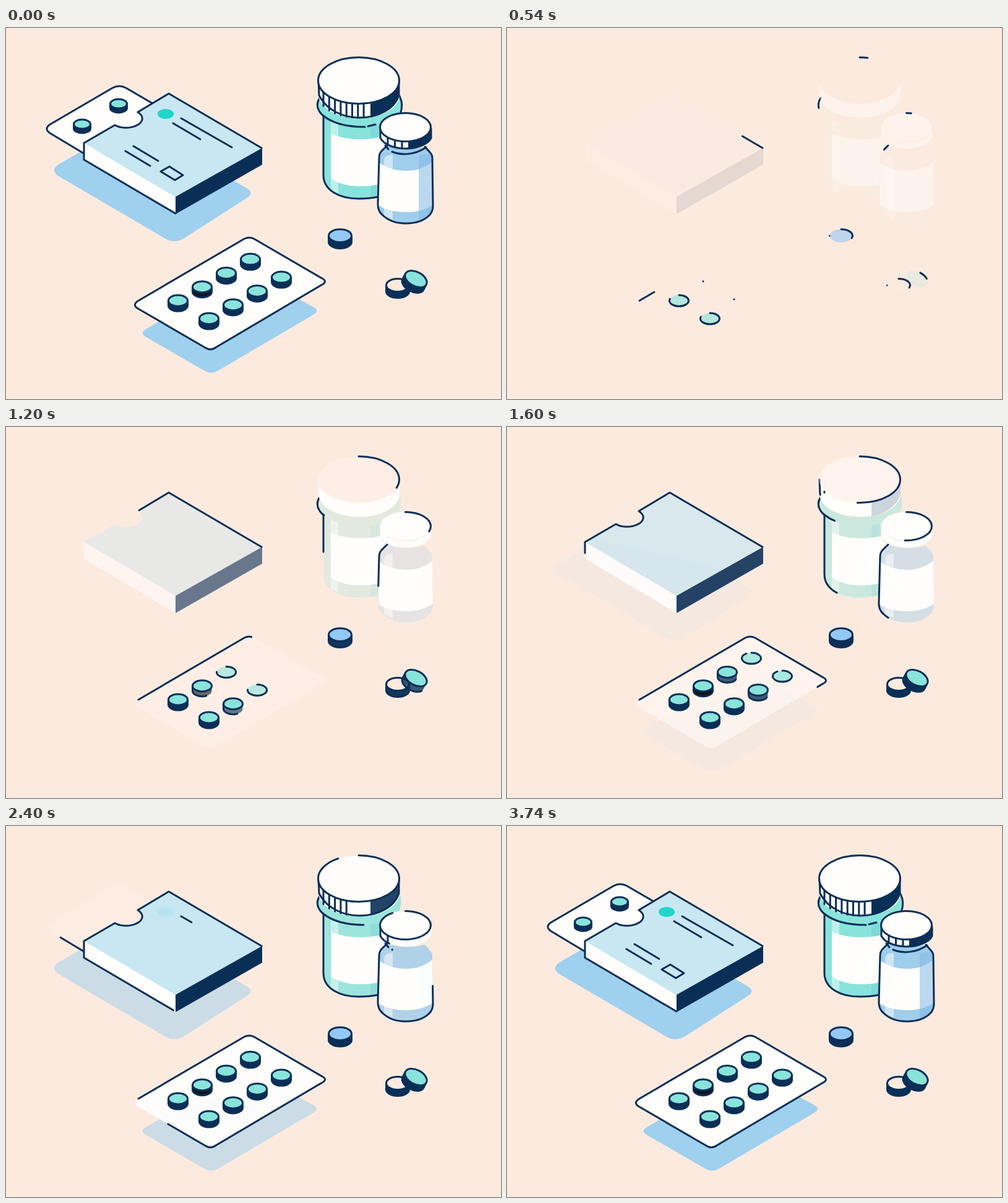
Recreate the animation shown at these times as an HTML page. Size 800 by 600 pixels, loop 3.94 s.

```html
<!DOCTYPE html>
<html lang="en">
<head>
<meta charset="utf-8">
<title>Medicine</title>
<style>
  html, body { margin: 0; width: 100%; height: 100%; overflow: hidden; background: #fdeadf; }
  svg { display: block; width: 800px; height: 600px; }
</style>
</head>
<body>
<svg id="stage" viewBox="0 0 800 600"></svg>
<script>
const LOOP = 3940;
const BG = '#fdeadf', NAVY = '#0a2f57', MINT = '#88e4db', SKY = '#9fd0ee', WHITE = '#fffefd';
const stage = document.getElementById('stage');
const parts = [];
let parent = stage;

function add(tag, attrs) {
  const el = document.createElementNS('http://www.w3.org/2000/svg', tag);
  for (const name in attrs) el.setAttribute(name, attrs[name]);
  return parent.appendChild(el);
}

// A shape that fades in between start and end.
function fill(d, color, start, end, alpha = 1) {
  const el = add('path', { d, fill: color, 'fill-opacity': alpha });
  parts.push({ start, end, show: p => el.setAttribute('opacity', p) });
}

// A stroke that draws itself between start and end.
function line(d, start, end) {
  const el = add('path', {
    d, pathLength: 1, fill: 'none', stroke: NAVY, 'stroke-width': 3,
    'stroke-linecap': 'round', 'stroke-linejoin': 'round'
  });
  parts.push({ start, end, show: p => {
    el.setAttribute('visibility', p > 0 ? 'visible' : 'hidden');
    el.setAttribute('stroke-dasharray', p < 1 ? p + ' 2' : 'none');
  } });
}

const mask = d => add('path', { d, fill: BG });

const ellipse = (x, y, rx, ry) =>
  `M${x} ${y - ry}A${rx} ${ry} 0 0 1 ${x} ${y + ry}A${rx} ${ry} 0 0 1 ${x} ${y - ry}Z`;

function pill({ x, y, rx, ry, depth, tilt = 0, color = MINT, side = NAVY, rim, top, body }) {
  parent = add('g', { transform: `translate(${x} ${y}) rotate(${tilt})` });
  const arc = `A${rx} ${ry} 0 0 `;
  fill(`M${-rx} 0${arc}0 ${rx} 0V${depth}${arc}1 ${-rx} ${depth}Z`, side, ...body);
  line(`M${-rx} 0V${depth}${arc}0 ${rx} ${depth}V0`, ...body);
  fill(ellipse(0, 0, rx, ry), color, ...top);
  line(ellipse(0, 0, rx, ry), ...rim);
  parent = stage;
}

// Ridges along the front of a cap, one after another.
function ribs({ x, step, count, cx, cy, rx, ry, height, start, gap, time }) {
  for (let i = 0; i < count; i++) {
    const px = x + i * step;
    const py = cy + ry * Math.sqrt(1 - ((px - cx) / rx) ** 2);
    line(`M${px} ${py}v${height}`, start + i * gap, start + i * gap + time);
  }
}

function carton() {
  fill('M84 221L150 183L330 225L389 259Q402 267 389 275L288 340Q273 349 258 341L84 239Q72 230 84 221Z', SKY, 1150, 3550);

  const card = 'M126 203L71 170Q61 163 71 156L172 97Q183 91 194 97L237 122';
  fill(card + 'L237 165L150 203Z', WHITE, 2150, 3600);
  line(card, 2215, 2915);
  for (const [x, y] of [[123, 155.5], [182, 122.5]]) {
    pill({ x, y, rx: 13.5, ry: 7.5, depth: 7,
      rim: [2470, 3700], top: [2400, 3700], body: [2820, 3740] });
  }

  const notch = 'L213 136C224 143 222 153 210 158C200 163 184 162 176 157L126 186';
  fill('M126 186L274 273V301L126 213Z', WHITE, 160, 1990);
  fill('M413 194L263 106' + notch + 'L274 273Z', '#c8e7f3', 200, 2468);
  fill('M274 273L414 194V221L274 301Z', NAVY, 160, 1990);
  line('M413 194L263 106' + notch + 'V213L274 300', 130, 2530);

  fill(ellipse(258, 139, 13, 8), '#1fd6cb', 2150, 3250);
  line('M283 146L365 193', 2220, 2820);
  line('M270 154L314 180', 2450, 2850);
  line('M206 191L246 215', 2640, 3180);
  line('M193 199L233 223', 2780, 3380);
  line('M286 238L273 246L250 232L264 224Z', 2650, 3450);
}

function blister() {
  fill('M226 487L276 458L430 415L498 452Q506 457 498 463L343 554Q332 561 320 554L225 499Q216 493 226 487Z', SKY, 1150, 3550);
  const card = 'M214 441L385 341Q393 337 401 341L511 405Q520 410 511 415L340 516Q331 523 322 517L212 453Q204 447 214 441Z';
  fill(card, WHITE, 600, 2700);
  line(card, 180, 2980);
  for (let i = 0; i < 8; i++) {
    const col = i >> 1, row = i & 1, s = 185 + col * 340;
    pill({
      x: 278 + col * 39 + row * 50, y: 441 - col * 22.3 + row * 29,
      rx: 15.5, ry: 9, depth: 8, side: i === 2 ? '#10141f' : NAVY,
      rim: [s, s + 500], top: [s, s + 600], body: [s + 350, s + 910]
    });
  }
}

function jar() {
  fill('M506 110Q499 126 506 134Q508 138 513 142V238C513 262 538 276 570 276C602 276 628 262 628 240V146Q644 132 636 108A65 37 0 0 1 506 110Z', MINT, 200, 3300);
  fill('M525 150L537 155V268L525 262Z', WHITE, 0, 1200, 0.45);
  fill('M589 159L602 157V273L589 275Z', '#78cfd6', 200, 3300, 0.5);
  fill('M525 171Q545 180 572 180Q605 180 628 168V244Q605 256 572 256Q543 256 525 243Z', WHITE, 0, 1200);
  line('M507 113Q500 124 506 134Q508 138 513 142', 180, 870);
  line('M513 142Q535 160 580 160', 1080, 2560);
  line('M585 159L597 156', 2500, 2900);
  line('M636 110Q643 124 637 139', 3000, 3700);
  line('M513 143V238C513 262 538 276 570 276Q588 276 602 273', 593, 2270);

  fill('M505 85A65.5 38 0 0 0 636 85V108A65.5 37 0 0 1 505 108Z', WHITE, 0, 1200);
  fill('M589 121.5A66 38 0 0 0 636 85V108C631 128 612 140 589 144Z', NAVY, 1130, 2730);
  ribs({ x: 513, step: 9.3, count: 8, cx: 570, cy: 85, rx: 66, ry: 38, height: 22,
    start: 1570, gap: 165, time: 160 });
  line('M505 85L506 109C518 133 545 145 571 145C602 145 629 130 635 108V85', 1340, 2490);
  fill(ellipse(570, 85, 65.5, 37.5), WHITE, 600, 2700);
  line(ellipse(570, 85, 65.5, 37.5), 180, 2980);
}

function vial() {
  const shape = 'M616 190L607 199Q603 203 603 210L601 285Q601 296 608 302Q622 316 646 316Q672 316 685 302Q690 296 690 288L689 210Q689 205 685 201L677 192';
  const body = shape + 'Q646 200 616 190Z';
  mask(body);
  mask('M605 160A41 23 0 0 1 687 160V178A41 18 0 0 1 605 178Z');
  fill(body, '#9fcdec', 200, 3300);
  fill('M611 214Q612 205 625 205V310L611 303Z', WHITE, 0, 1200, 0.5);
  fill('M603 218Q622 231 646 231Q672 231 689 216L690 286Q672 298 646 298Q620 298 602 287Z', WHITE, 0, 1200);
  fill('M667 205L687 203Q689 206 689 212L690 288Q688 302 667 313Z', '#86bbe6', 2200, 3700, 0.55);
  line(shape, 180, 3410);
  line('M613 190L618 196', 2150, 2400);
  line('M624 200C638 206 660 206 679 193', 2350, 3300);

  fill('M605 162A41 23 0 0 0 687 162V176C682 189 664 195 646 195C628 195 610 189 605 177Z', WHITE, 0, 1200);
  fill('M650 183A41 23 0 0 0 687 162V178C682 188 666 195 650 195Z', NAVY, 2350, 3050);
  ribs({ x: 617, step: 11.5, count: 3, cx: 646, cy: 161, rx: 41, ry: 23, height: 10,
    start: 2240, gap: 220, time: 150 });
  line('M605 163V178C612 190 630 195 646 195C664 195 682 188 687 178V163', 2100, 2950);
  fill(ellipse(645.5, 160.5, 41, 23), WHITE, 0, 1200);
  line(ellipse(645.5, 160.5, 41, 23), 180, 2980);
}

function loosePills() {
  const size = { rx: 18.5, ry: 10.5, depth: 10 };
  pill({ ...size, x: 540, y: 336, color: '#93c8f6',
    rim: [270, 990], top: [200, 800], body: [500, 1300] });
  pill({ ...size, x: 633, y: 416, color: BG,
    rim: [270, 990], top: [200, 800], body: [500, 1300] });
  pill({ x: 662.5, y: 406, rx: 19, ry: 11.5, depth: 10, tilt: 28,
    rim: [320, 1170], top: [300, 1150], body: [640, 1440] });
}

carton();
blister();
jar();
vial();
loosePills();

// The loop opens on the finished picture, then redraws it at 15 steps a second.
let shown = -1;
function render(now) {
  const step = Math.floor(Math.floor((now % LOOP) / 10) * 3 / 20);
  if (step === shown) return;
  shown = step;
  const t = step ? step * 200 / 3 : LOOP;
  for (const { start, end, show } of parts) {
    const x = Math.min(1, Math.max(0, (t - start) / (end - start)));
    show((1 - Math.cos(Math.PI * x)) / 2);
  }
}

function tick(now) {
  render(now);
  requestAnimationFrame(tick);
}
render(0);
requestAnimationFrame(tick);
</script>
</body>
</html>
```
